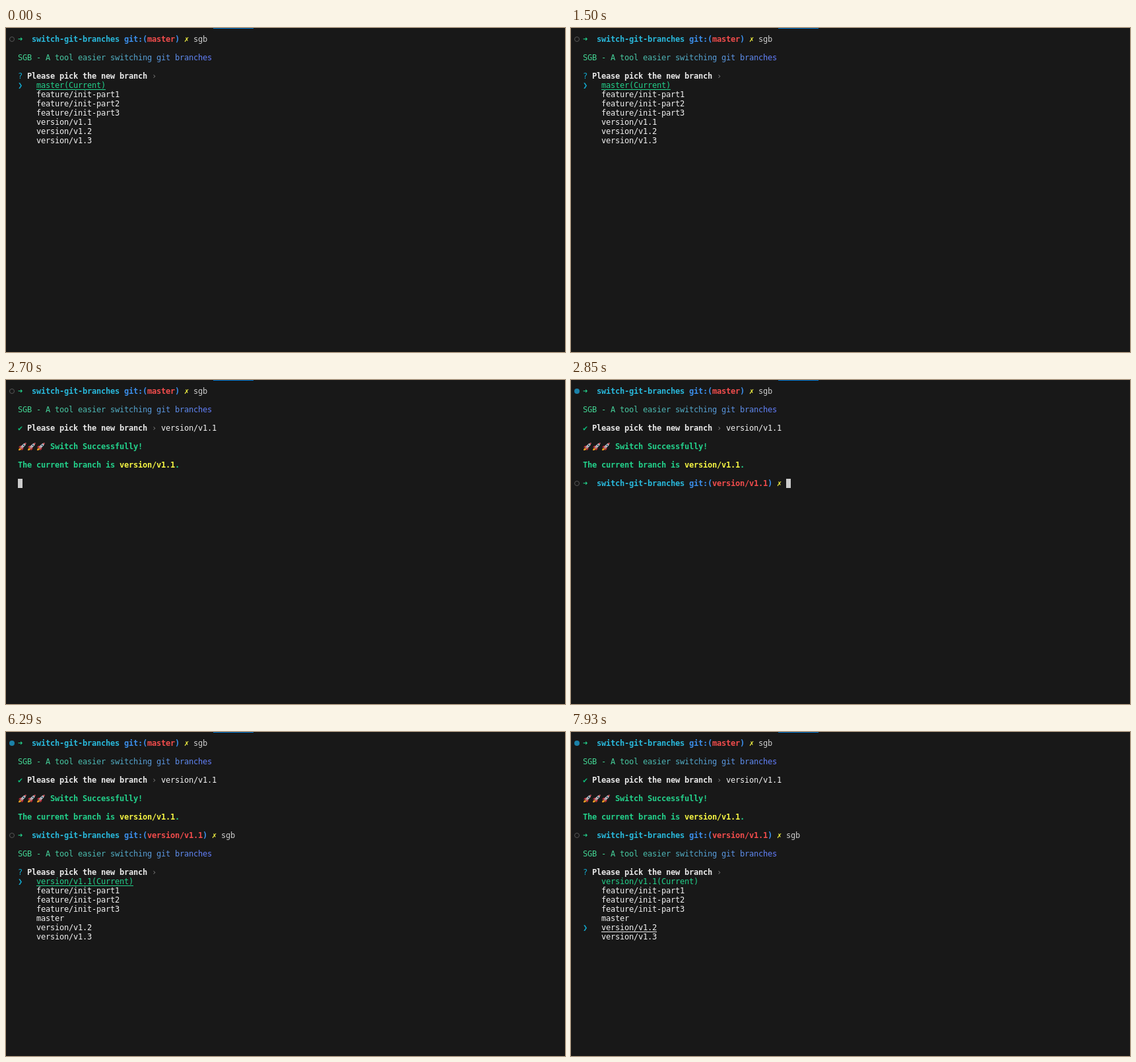
An HTML page that plays this animation: 847 by 492 pixels, repeating every 8000 ms.

```html
<!DOCTYPE html>
<html lang="en">
<head>
<meta charset="utf-8">
<title>Terminal</title>
<style>
  html, body { margin: 0; width: 100%; height: 100%; overflow: hidden; background: #181818; }
  #term { position: absolute; left: 0; top: 0; width: 847px; height: 492px; overflow: hidden;
    font: 12px/14px "DejaVu Sans Mono", monospace; white-space: pre; font-variant-ligatures: none; }
  #term > * { position: absolute; }
  .t { height: 14px; }
  .b { font-weight: bold; }
  .u { box-shadow: inset 0 -1px currentColor; }
  .bar { left: 314px; top: 0; width: 61px; height: 1px; background: #0078d4; }
  .dot { left: 5px; width: 8px; height: 8px; border-radius: 50%; box-sizing: border-box; }
  .ring { border: 1.6px solid #565656; }
  .done { background: #1b81a8; }
  .cursor { width: 7px; height: 14px; background: #ccc; }
</style>
</head>
<body>
<div id="term"></div>
<script>
const LOOP = 8000, CELL = 7, LINE = 14, LEFT = 18, TOP = 10;
const C = {
  text: '#cccccc', white: '#e8e8e8', item: '#f2f2f2', gray: '#777777',
  green: '#23d18b', check: '#0dbc79', cyan: '#11a8cd', sky: '#29b8db',
  blue: '#3b8eea', red: '#f14c4c', yellow: '#f5f543'
};
const term = document.getElementById('term');

// [time, selected row]
const picks1 = [[0, 0], [150, 1], [450, 2], [600, 3], [750, 4], [1050, 5], [1200, 6],
  [1500, 0], [1800, 1], [1950, 2], [2100, 3], [2250, 4]];
const picks2 = [[6290, 0], [6880, 1], [7030, 2], [7330, 3], [7780, 4], [7930, 5]];
const SWITCHED = 2700, PROMPT = 2850, TYPED = 5400, ENTER = 6140, LIST = 6290;

const features = [1, 2, 3].map(n => 'feature/init-part' + n);
const list1 = ['master(Current)', ...features, 'version/v1.1', 'version/v1.2', 'version/v1.3'];
const list2 = ['version/v1.1(Current)', ...features, 'master', 'version/v1.2', 'version/v1.3'];

const at = (col, row) => `left:${LEFT + col * CELL}px;top:${TOP + row * LINE}px`;
const put = (col, row, str, color, cls = '') =>
  `<span class="t ${cls}" style="${at(col, row)};color:${color}">${str}</span>`;
const dot = (row, cls) => `<i class="dot ${cls}" style="top:${TOP + row * LINE + 3}px"></i>`;
const cursor = (col, row) => `<i class="cursor" style="${at(col, row)}"></i>`;

function prompt(row, branch, cmd) {
  const end = 28 + branch.length;
  return put(0, row, '➜', C.green, 'b') +
    put(3, row, 'switch-git-branches', C.sky, 'b') +
    put(23, row, 'git:(', C.blue, 'b') +
    put(28, row, branch, C.red, 'b') +
    put(end, row, ')', C.blue, 'b') +
    put(end + 2, row, '✗', C.yellow, 'b') +
    put(end + 4, row, cmd, C.text);
}

function banner(row) {
  const str = 'SGB - A tool easier switching git branches';
  const from = [66, 211, 146], to = [100, 126, 255];
  const chars = [...str].map((ch, i) => {
    const k = Math.max(0, (i / (str.length - 1) - 0.1) / 0.9);
    const rgb = from.map((v, j) => Math.round(v + (to[j] - v) * k));
    return `<span style="color:rgb(${rgb})">${ch}</span>`;
  });
  return put(0, row, chars.join(''), C.green);
}

function question(row, answer) {
  return (answer ? put(0, row, '✔', C.check) : put(0, row, '?', C.cyan)) +
    put(2, row, 'Please pick the new branch', C.white, 'b') +
    put(29, row, '›', C.gray) +
    (answer ? put(31, row, answer, C.item) : '');
}

function menu(row, items, sel) {
  return put(0, row + sel, '❯', C.cyan, 'b') + items.map((name, i) =>
    put(4, row + i, name, i ? C.item : C.green, i === sel ? 'u' : '')).join('');
}

function rocket(col, row) {
  return `<svg width="14" height="14" viewBox="0 0 14 14" style="${at(col, row)}">
    <path d="M1 13Q1 9.5 4 9L5.5 10.5Q4.5 13 1 13Z" fill="#f5a524"/>
    <path d="M5.5 5.5Q2.5 5.5 1 8.5L4.5 8.5ZM8.5 8.5Q8.5 11.5 5.5 13L5.5 9.5Z" fill="#c8303c"/>
    <path d="M12.5 1.5Q7.5 1.8 3.8 8.8L5.2 10.2Q12.2 6.5 12.5 1.5Z" fill="#c9ced3"/>
    <path d="M12.5 1.5Q11 1.5 9.6 2.4L11.6 4.4Q12.5 3 12.5 1.5Z" fill="#d4424a"/>
    <circle cx="8.8" cy="5.2" r="1.2" fill="#35566e"/>
    <path d="M3.5 10.5L6.8 7.2" stroke="#982832"/>
  </svg>`;
}

function success(row) {
  return [0, 2, 4].map(c => rocket(c, row)).join('') +
    put(7, row, 'Switch Successfully!', C.green, 'b') +
    put(0, row + 2, 'The current branch is ', C.green, 'b') +
    put(22, row + 2, 'version/v1.1', C.yellow, 'b') +
    put(34, row + 2, '.', C.green, 'b');
}

const pick = (steps, t) => steps.filter(s => s[0] <= t).pop()[1];

function scene(t) {
  let out = '<i class="bar"></i>' + dot(0, t < PROMPT ? 'ring' : 'done') +
    prompt(0, 'master', 'sgb') + banner(2);
  if (t < SWITCHED) return out + question(4) + menu(5, list1, pick(picks1, t));

  out += question(4, 'version/v1.1') + success(6);
  if (t < PROMPT) return out + cursor(0, 10);

  out += dot(10, 'ring') + prompt(10, 'version/v1.1', t < TYPED ? '' : 'sgb');
  if (t < TYPED) return out + cursor(44, 10);
  if (t < ENTER) return out + cursor(47, 10);
  if (t < LIST) return out + cursor(0, 11);
  return out + banner(12) + question(14) + menu(15, list2, pick(picks2, t));
}

// Snap the font's advance to the terminal cell.
function fitCell() {
  term.innerHTML = `<span>${'m'.repeat(100)}</span>`;
  const advance = term.firstChild.getBoundingClientRect().width / 100;
  term.style.letterSpacing = CELL - advance + 'px';
}

let shown = '';
function draw(now) {
  const html = scene((now - start) % LOOP);
  if (html !== shown) term.innerHTML = shown = html;
}
function tick() {
  draw(performance.now());
  requestAnimationFrame(tick);
}

fitCell();
const start = performance.now();
tick();
</script>
</body>
</html>
```
